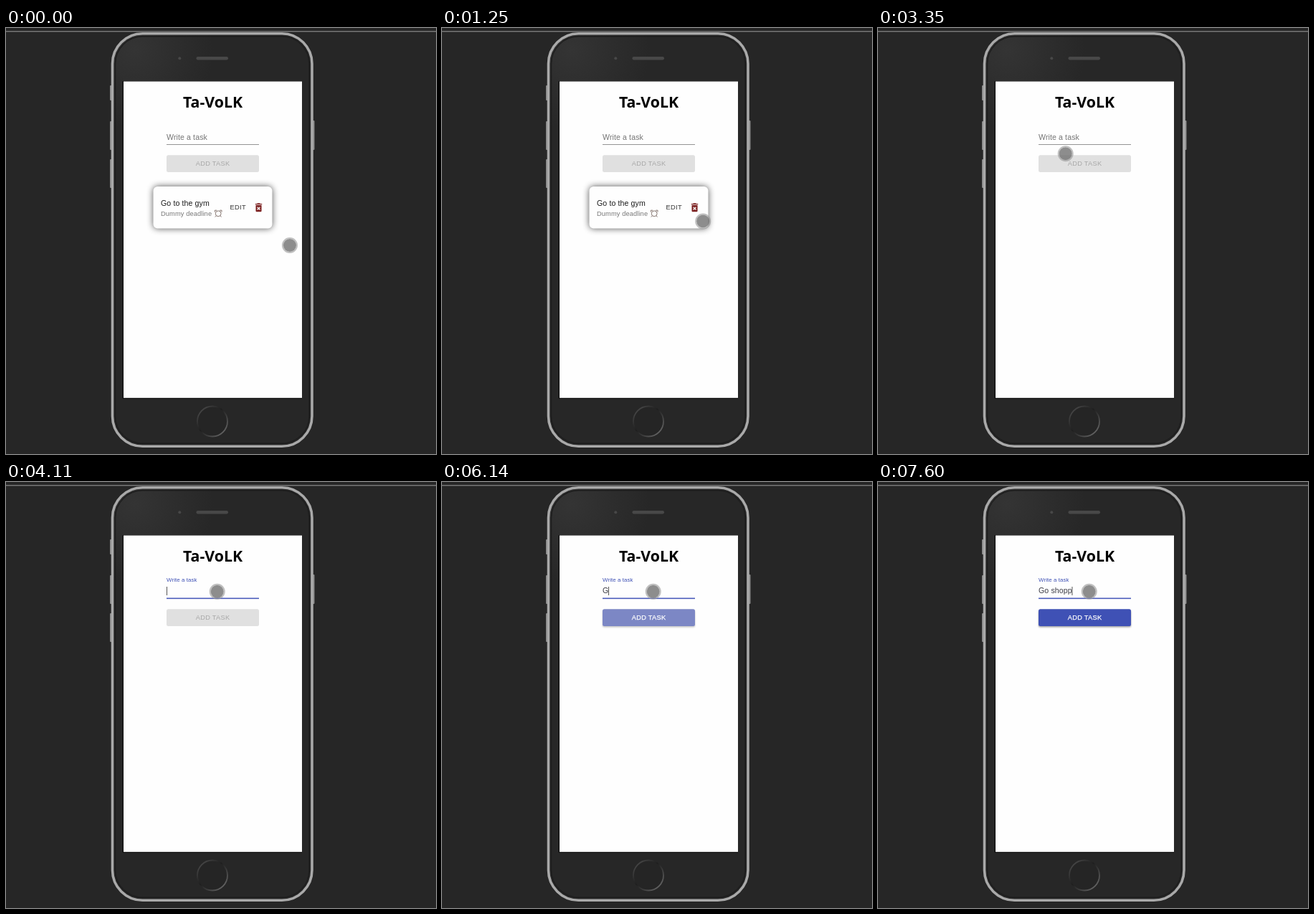
An HTML page for the animation above (8 s loop, 600x594 px).

```html
<!DOCTYPE html>
<html lang="en">
<head>
<meta charset="utf-8">
<title>Task list</title>
<style>
  html, body { margin: 0; width: 100%; height: 100%; overflow: hidden; background: #262626; }
  svg { display: block; width: 100%; height: 100%; }
  text { font-family: "Liberation Sans", Arial, sans-serif; white-space: pre; }
  .body { font-size: 10.6px; letter-spacing: .1px; }
  .small { font-size: 9.3px; letter-spacing: .1px; }
  .button { font-size: 9.3px; letter-spacing: .27px; }
  .title { font: 700 21.3px "Noto Sans", "Open Sans", sans-serif; }
</style>
</head>
<body>
<svg viewBox="0 0 600 594">
  <defs>
    <radialGradient id="glow" gradientUnits="userSpaceOnUse" cx="180" cy="30" r="110">
      <stop offset="0" stop-color="#343434"/>
      <stop offset="1" stop-color="#272727"/>
    </radialGradient>
    <linearGradient id="ring" x1="0" y1="0" x2="1" y2="1">
      <stop offset="0" stop-color="#555"/>
      <stop offset=".45" stop-color="#1e1e1e"/>
      <stop offset="1" stop-color="#777"/>
    </linearGradient>
    <filter id="soft" x="-20%" y="-50%" width="140%" height="200%">
      <feGaussianBlur stdDeviation="5"/>
    </filter>
    <filter id="lift" x="-10%" y="-50%" width="120%" height="200%">
      <feGaussianBlur stdDeviation="1"/>
    </filter>
  </defs>

  <rect width="600" height="594" fill="#262626"/>
  <rect y="4" width="600" height="1.5" fill="#777"/>

  <g fill="#8c8c8c">
    <rect x="145" y="80" width="3" height="21" rx="1"/>
    <rect x="145" y="130" width="3" height="40" rx="1"/>
    <rect x="145" y="183" width="3" height="40" rx="1"/>
    <rect x="427" y="129" width="3.5" height="41" rx="1"/>
  </g>
  <rect x="148.5" y="7.8" width="278.5" height="575.4" rx="42" fill="url(#glow)" stroke="#a9a9a9" stroke-width="3.6"/>
  <rect x="152.5" y="11.8" width="270.5" height="567.4" rx="38" fill="none" stroke="#1d1d1d" stroke-width="1.5"/>
  <circle cx="242.3" cy="42.3" r="2" fill="#484848"/>
  <rect x="265.5" y="40" width="44.5" height="4.4" rx="2.2" fill="#484848"/>
  <circle cx="288" cy="548.5" r="21" fill="#252525" stroke="url(#ring)" stroke-width="1.8"/>
  <rect x="162.8" y="74" width="250.2" height="443" fill="#0d0d0d"/>
  <rect x="164" y="74.5" width="249" height="441.3" fill="#fefefe"/>

  <text class="title" x="288.5" y="111" text-anchor="middle" fill="#000">Ta-VoLK</text>

  <g id="label"><text class="body">Write a task</text></g>
  <text id="input" class="body" x="224" y="155.3" fill="#3c3c46"></text>
  <rect id="caret" y="146" width="1" height="12" fill="#555"/>
  <rect x="224" y="162" width="129" height="1" fill="#949494"/>
  <rect id="focus" y="161.5" height="1.6" fill="#4c5dbb"/>

  <rect id="shade" x="224" y="179" width="129" height="23.5" rx="2.5" fill="#444" filter="url(#lift)"/>
  <rect id="add" x="224" y="177.3" width="129" height="23.7" rx="2.5"/>
  <text id="addText" class="button" x="288.6" y="192.2" text-anchor="middle">ADD TASK</text>

  <g id="card">
    <rect x="205.5" y="221" width="166" height="58.5" rx="6" filter="url(#soft)" opacity=".68"/>
    <rect x="205.5" y="221" width="166" height="58.5" rx="6" fill="#fefefe"/>
    <text class="body" x="216" y="248" fill="#1c1c1c">Go to the gym</text>
    <text class="small" x="216" y="262" fill="#777">Dummy deadline</text>
    <g fill="none" stroke="#85756f" stroke-width="1">
      <circle cx="296.2" cy="258.8" r="3.9"/>
      <path d="M291.4 256.6v-2.4h2.8M301 256.6v-2.4h-2.8M293.4 261.8l-1.6 1.7M299 261.8l1.6 1.7"/>
    </g>
    <text class="button" x="312.6" y="253.4" fill="#333">EDIT</text>
    <path transform="translate(344.5 242.2) scale(.67)" fill="#7d2222" d="M6 19c0 1.1.9 2 2 2h8c1.1 0 2-.9 2-2V7H6v12zm2.46-7.12l1.41-1.41L12 12.59l2.12-2.12 1.41 1.41L13.41 14l2.12 2.12-1.41 1.41L12 15.41l-2.12 2.12-1.41-1.41L10.59 14l-2.13-2.12zM15.5 4l-1-1h-5l-1 1H5v2h14V4z"/>
  </g>

  <g id="pointer">
    <circle id="halo" r="10" fill="none" stroke-width="2"/>
    <circle id="dot" r="9"/>
  </g>
</svg>
<script>
  const LOOP = 8000;
  const $ = id => document.getElementById(id);
  const set = (id, attrs) => {
    for (const name in attrs) $(id).setAttribute(name, attrs[name]);
  };
  const lerp = (a, b, p) => a + (b - a) * p;
  const easeOut = (p, power = 2) => 1 - (1 - p) ** power;
  const mix = (a, b, p) => `rgb(${a.map((v, i) => Math.round(lerp(v, b[i], p)))})`;
  const within = (t, from, to) => t >= from && t < to;

  // Progress in n equal jumps, the first at `from`, the last at `to`.
  const stepped = (t, from, to, n) => {
    const k = Math.floor((t - from) / (to - from) * (n - 1) + 1.05);
    return Math.min(n, Math.max(0, k)) / n;
  };

  const START = [396, 303];
  const MOVES = [
    { from: 480, to: 710, steps: 4, at: [379, 298] },
    { from: 1020, to: 1570, steps: 8, at: [354.7, 251.2] },
    { from: 3210, to: 3350, steps: 3, at: [261.7, 175.2] },
    { from: 3590, to: 3660, steps: 2, at: [294.7, 152.8] }
  ];
  const TYPED = "Go shopp";
  const KEYS = [6050, 6220, 6580, 6920, 6990, 7220, 7520, 7600];

  function drawPointer(t) {
    let [x, y] = START;
    for (const m of MOVES) {
      const p = easeOut(stepped(t, m.from, m.to, m.steps));
      x = lerp(x, m.at[0], p);
      y = lerp(y, m.at[1], p);
    }
    const pressed = within(t, 2740, 2890) || within(t, 3800, 3950);
    set("pointer", { transform: `translate(${x} ${y})` });
    set("halo", { stroke: pressed ? "rgba(220,214,60,.75)" : "rgba(150,150,150,.6)" });
    set("dot", { fill: pressed ? "rgba(196,182,24,.8)" : "rgba(112,112,112,.8)" });
  }

  function drawField(t) {
    const p = easeOut(stepped(t, 3800, 4110, 5));
    const size = lerp(1, .75, p);
    set("label", {
      transform: `translate(224 ${lerp(156, 139, p)}) scale(${size})`,
      fill: mix([117, 117, 117], [63, 81, 181], p)
    });
    set("focus", { x: 288.5 - 64.5 * p, width: 129 * p });

    const count = KEYS.filter(k => t >= k).length;
    const input = $("input");
    input.textContent = TYPED.slice(0, count);
    const shown = within(t, 3800, 4410) || within(t, 4890, 5440) || t >= 5900;
    set("caret", {
      x: 224 + (count ? input.getComputedTextLength() - .3 : 0),
      opacity: shown ? 1 : 0
    });
  }

  function drawButton(t) {
    const p = easeOut(stepped(t, 6050, 6300, 4), 1.4);
    set("add", { fill: mix([224, 224, 224], [63, 81, 181], p) });
    set("shade", { opacity: p * .5 });
    set("addText", {
      fill: p ? "#fff" : "#a8a8a8",
      stroke: p ? "#fff" : "none",
      "stroke-width": .25
    });
  }

  function draw(t) {
    set("card", { visibility: t < 2810 ? "visible" : "hidden" });
    drawField(t);
    drawButton(t);
    drawPointer(t);
  }

  const began = performance.now();
  function tick() {
    draw((performance.now() - began) % LOOP);
    requestAnimationFrame(tick);
  }
  tick();
</script>
</body>
</html>
```
